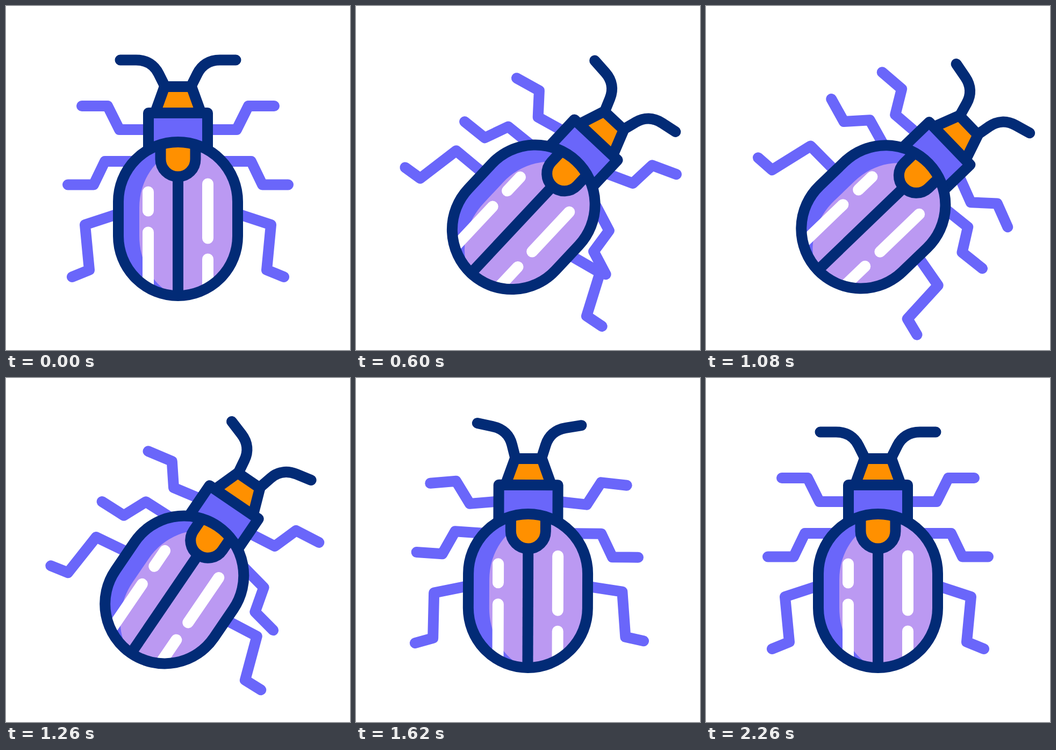
An HTML page for the animation above (2.4 s loop, 640x640 px).

```html
<!DOCTYPE html>
<html lang="en">
<head>
<meta charset="utf-8">
<title>Beetle</title>
<style>
  html, body { margin: 0; height: 100%; overflow: hidden; background: #fff; }
  svg { display: block; width: 100%; height: 100%; }
  path { fill: none; stroke-width: 20; stroke-linejoin: round; }
  .navy { stroke: #022b76; }
  .limb { stroke-linecap: round; }
  .leg { stroke: #6a66fa; }
  .violet { fill: #6a66fa; }
  .lilac { fill: #bb99f2; }
  .orange { fill: #ff9000; }
  .shine { stroke: #fff; stroke-width: 21; }
</style>
</head>
<body>
<svg viewBox="0 0 640 640">
  <g id="beetle">
    <g id="left"></g>
    <g id="right" transform="translate(640) scale(-1 1)"></g>
    <path class="navy orange" d="M278 197L295 150H345L362 197"/>
    <path class="navy violet" d="M265 268V199H375V268"/>
    <path class="violet" d="M209 364a111 111 0 0 1 222 0v64a111 111 0 0 1-222 0z"/>
    <path class="lilac" d="M320 267A101 113 0 0 0 248 375V428A101 118 0 0 0 305 534L320 539A111 111 0 0 0 431 428V364A111 111 0 0 0 320 253z"/>
    <path class="shine limb" d="M264.5 346V381M264.5 421V518M375.5 331V432M375.5 471V518"/>
    <path class="navy" d="M320 317V539"/>
    <path class="navy orange" d="M287.5 257V285a32.5 32.5 0 0 0 65 0V257"/>
    <path class="navy" d="M209 364a111 111 0 0 1 222 0v64a111 111 0 0 1-222 0z"/>
  </g>
</svg>
<script>
const LOOP = 2400, STRIDE = 800;
const beetle = document.getElementById('beetle');

// Goes softly from 0 to 1 between two times
function ease(t, from, to) {
  const u = Math.min(1, Math.max(0, (t - from) / (to - from)));
  return (1 - Math.cos(Math.PI * u)) / 2;
}
const bump = (t, from, peak, to) => ease(t, from, peak) - ease(t, peak, to);

// Turn right, swing back a little too far, settle
const turn = t => 47.5 * ease(t, 175, 705) - 52.5 * ease(t, 1000, 1780) + 5 * ease(t, 1780, 2260);

// Every limb mixes the same four movements
const moves = {
  lean: t => ease(t, 0, 320) - ease(t, 1400, 1920),
  swing: t => Math.cos(2 * Math.PI * (t - 1000) / STRIDE) * (ease(t, 0, 320) - ease(t, 1920, 2260)),
  kick: t => bump(t, 0, 320, 600),
  drift: t => bump(t, 320, 600, 1080) - bump(t, 1080, 1400, 1920)
};

// Limbs drawn on the left side; the right side is mirrored
const limbs = [
  { d: 'M141 186H189L211 230H260', pivot: [260, 230],
    left: { lean: -9.3, swing: 4.7, kick: -9.7 },
    right: { lean: 1.9, swing: 22.3, kick: -15.6, drift: -2.2 } },
  { d: 'M115 332.5H163L184 289H235', pivot: [235, 289],
    left: { lean: 5.2, swing: 12, kick: 10, drift: 2.5 },
    right: { lean: 4.3, swing: -14.7, kick: 11.9 } },
  { d: 'M123 504L155 491L147 407L205 388', pivot: [205, 388],
    left: { lean: 14.2, swing: 4, kick: 19.4, drift: 4.6 },
    right: { lean: -19, swing: 12.3, kick: -5.3 } },
  { d: 'M212.5 100.5H242C262 100.5 276 110 284 126L295 148', pivot: [295, 150], color: 'navy',
    left: { lean: 11.6, swing: -2.6, kick: 17.3, drift: -8.8 },
    right: { lean: -14, swing: -4, kick: -13.6 } }
];

function rotate(node, angle, pivot) {
  node.setAttribute('transform', `rotate(${angle} ${pivot})`);
}

const joints = limbs.flatMap(({ d, pivot, color = 'leg', ...sides }) =>
  Object.entries(sides).map(([side, mix]) => {
    const path = document.createElementNS(beetle.namespaceURI, 'path');
    path.setAttribute('d', d);
    path.setAttribute('class', 'limb ' + color);
    document.getElementById(side).append(path);
    const sign = side === 'left' ? 1 : -1;
    return t => {
      const angle = Object.entries(mix).reduce((sum, [name, size]) => sum + size * moves[name](t), 0);
      rotate(path, sign * angle, pivot);
    };
  }));

function draw() {
  const t = performance.now() % LOOP;
  rotate(beetle, turn(t), [320, 384]);
  joints.forEach(move => move(t));
  requestAnimationFrame(draw);
}
draw();
</script>
</body>
</html>
```
